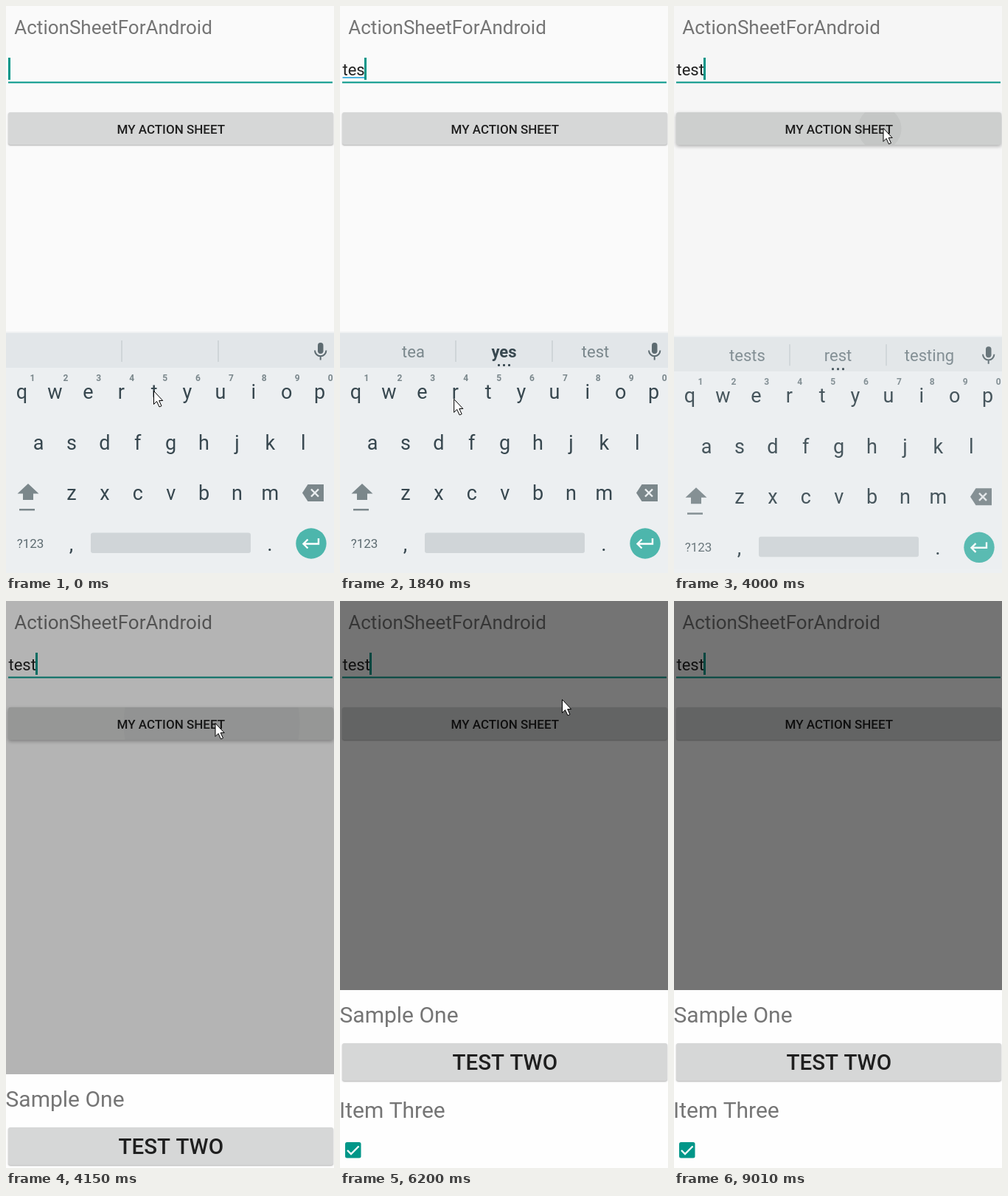
Recreate the animation shown at these times as an HTML page with a canvas. Size 445x768 px, loop 9110 ms.

```html
<!DOCTYPE html>
<html lang="en">
<head>
<meta charset="utf-8">
<title>Action sheet</title>
<style>
html, body { margin: 0; width: 100%; height: 100%; overflow: hidden; background: #fafafa; }
canvas { display: block; }
</style>
</head>
<body>
<canvas id="stage" width="445" height="768"></canvas>
<script>
const ctx = document.getElementById('stage').getContext('2d');
const LOOP = 9110, TEAL = '#009688', GREY = '#757575', INK = '#37474f', ICON = '#7b878b';

// time typed, field text, suggestions, autocorrect on
const typing = [
  [-1000, '', null, false],
  [250, 't', ['that', 'the', 'to'], false],
  [880, 'te', ['team', 'the', 'term'], true],
  [1500, 'tes', ['tea', 'yes', 'test'], true],
  [2240, 'test', ['tests', 'rest', 'testing'], false]
];
const SUGGEST_DELAY = 120;

// pointer way points: time, x, y
const path = [
  [0, 200, 521], [350, 200, 521], [800, 120, 535.5], [1170, 120, 535.5],
  [1450, 91, 597], [1560, 91, 597], [1840, 154, 532], [2100, 200, 525],
  [2360, 200, 525], [3040, 283.5, 165], [4900, 283.5, 165], [5450, 322, 169],
  [5960, 303, 140], [6200, 301, 133], [6920, 298, 130], [7200, 298, 130],
  [8220, 372, 383], [8340, 378, 450], [8700, 394, 769], [LOOP, 394, 790]
];

const clamp = v => Math.max(0, Math.min(1, v));
const lastBefore = (list, t) => list.filter(item => item[0] <= t).pop();

function text(s, x, y, size, color, align = 'left', weight = 400) {
  ctx.font = `${weight} ${size}px Roboto, sans-serif`;
  ctx.textAlign = align;
  ctx.fillStyle = color;
  ctx.fillText(s, x, y);
}

function rect(x, y, w, h, color, r = 0) {
  ctx.fillStyle = color;
  ctx.beginPath();
  ctx.roundRect(x, y, w, h, r);
  ctx.fill();
}

function disc(x, y, r, color) {
  ctx.fillStyle = color;
  ctx.beginPath();
  ctx.arc(x, y, r, 0, 7);
  ctx.fill();
}

function shape(d, fill, stroke, width) {
  const p = new Path2D(d);
  if (fill) {
    ctx.fillStyle = fill;
    ctx.fill(p);
  }
  if (stroke) {
    ctx.strokeStyle = stroke;
    ctx.lineWidth = width;
    ctx.stroke(p);
  }
}

function button(y, h, label, base, size, raised) {
  ctx.save();
  ctx.shadowColor = 'rgba(0,0,0,.3)';
  ctx.shadowBlur = raised ? 5 : 2;
  ctx.shadowOffsetY = raised ? 2 : 1;
  rect(3, y, 441, h, raised ? '#d0d2d1' : '#d6d7d7', 3);
  ctx.restore();
  text(label, 223.8, base, size, '#1f1f1f', 'center', 500);
}

function ripple(t) {
  ctx.save();
  ctx.beginPath();
  ctx.roundRect(3, 144, 441, 44, 3);
  ctx.clip();
  disc(279, 166, 29 + (t - 4000) * .6, `rgba(0,0,0,${.045 * (4300 - t) / 300})`);
  ctx.restore();
}

function page(t) {
  rect(0, 0, 445, 768, '#fafafa');
  text('ActionSheetForAndroid', 11.3, 38, 26, GREY);

  const [typed, word] = lastBefore(typing, t);
  const corrected = lastBefore(typing, t - SUGGEST_DELAY)[3];
  text(word, 3.5, 94, 22, '#212121');
  const end = 3.5 + ctx.measureText(word).width;
  if (corrected) rect(3.5, 96, end - 3.5, 2, '#4db6e2');
  rect(3, 102.5, 440, 2, TEAL);
  if (t % 1000 < 550 || t - typed < 500) rect(Math.round(end) - 1, 70, 3, 30, TEAL);

  const pressed = t >= 4000 && t < 4300;
  button(144, 44, 'MY ACTION SHEET', 173, 17, pressed);
  if (pressed) ripple(t);
}

function sheet(p) {
  rect(0, 0, 445, 768, `rgba(0,0,0,${.533 * p})`);
  ctx.save();
  ctx.translate(0, 241 * (1 - p));
  rect(0, 527, 445, 300, '#fefefe');
  text('Sample One', -.5, 571, 30, GREY);
  button(599, 51, 'TEST TWO', 635, 29.6);
  text('Item Three', -1, 700, 30, GREY);
  rect(7, 733, 21.5, 21.5, TEAL, 2.5);
  shape('M10 744l5 5 10.5-10.5', null, '#fff', 2.4);
  ctx.restore();
}

function keys(row, x, y, size = 27, color = INK, weight = 400) {
  [...row].forEach((k, i) => text(k, x + 44.9 * i, y, size, color, 'center', weight));
}

function keyboard(t) {
  const gone = clamp((t - 3990) / 125);
  if (gone === 1) return;
  ctx.save();
  ctx.globalAlpha = 1 - gone;
  ctx.translate(0, 60 * gone);
  rect(0, 441, 445, 2, '#eff1f2');
  rect(0, 443, 445, 47, '#e2e6e9');
  rect(0, 490, 445, 278, '#eceff1');
  rect(156.5, 453, 1, 29, '#bcc4c8');
  rect(287.5, 453, 1, 29, '#bcc4c8');

  const [, , words, bold] = lastBefore(typing, t - SUGGEST_DELAY);
  if (words) {
    words.forEach((w, i) => {
      const strong = bold && i === 1;
      text(w, [99.5, 222.5, 346.5][i], 476, 22, strong ? INK : '#7a878c', 'center', strong ? 700 : 400);
    });
    for (const x of [214, 221, 228]) rect(x, 485, 3, 3, INK, 1);
  }

  // microphone
  rect(423, 456, 7.5, 15, '#5d6b71', 3.7);
  shape('M419 466.5a7.7 7.7 0 0 0 15.4 0M426.7 474v5.5', null, '#5d6b71', 2);

  keys('qwertyuiop', 21.5, 532);
  keys('1234567890', 36, 508, 12, '#7a878c', 700);
  keys('asdfghjkl', 44, 601);
  keys('zxcvbnm', 89, 669);

  // shift and backspace
  shape('M30 647l14.5 13.5h-7.5v8.500h-14v-8.500h-7.500z', ICON);
  rect(18, 681, 21, 2.5, ICON);
  shape('M402 659.500l7.500-11.500h21.500v23h-21.500z', ICON);
  shape('M414 654.500l10 10m0-10l-10 10', null, '#eceff1', 2.4);

  text('?123', 33, 734, 17, '#5d6b71', 'center');
  text(',', 88.5, 738, 28, INK, 'center');
  text('.', 358, 738, 28, INK, 'center');
  rect(115, 713.5, 217, 27.5, '#d0d5d8', 3);
  disc(414, 728, 20.7, '#4db6ac');
  shape('M424 721v7.500h-20M409.500 722.500l-6 6 6 6', null, '#fff', 2.4);
  ctx.restore();
}

function pointer(t) {
  const i = path.findIndex(p => p[0] > t);
  const [t0, x0, y0] = path[i - 1], [t1, x1, y1] = path[i];
  const k = (t - t0) / (t1 - t0);
  ctx.save();
  ctx.translate(x0 + (x1 - x0) * k + .5, y0 + (y1 - y0) * k + .5);
  shape('M0 0v18l4-4 3.500 7.500 3-1.300-3.300-7.200h5z', '#fff', '#000', 1);
  ctx.restore();
}

function draw(now) {
  const t = now % LOOP;
  page(t);
  const p = clamp((t - 3993) / 300);
  if (p > 0) sheet(p);
  keyboard(t);
  pointer(t);
}

const start = performance.now();
function loop() {
  draw(performance.now() - start);
  requestAnimationFrame(loop);
}
loop();
</script>
</body>
</html>
```
